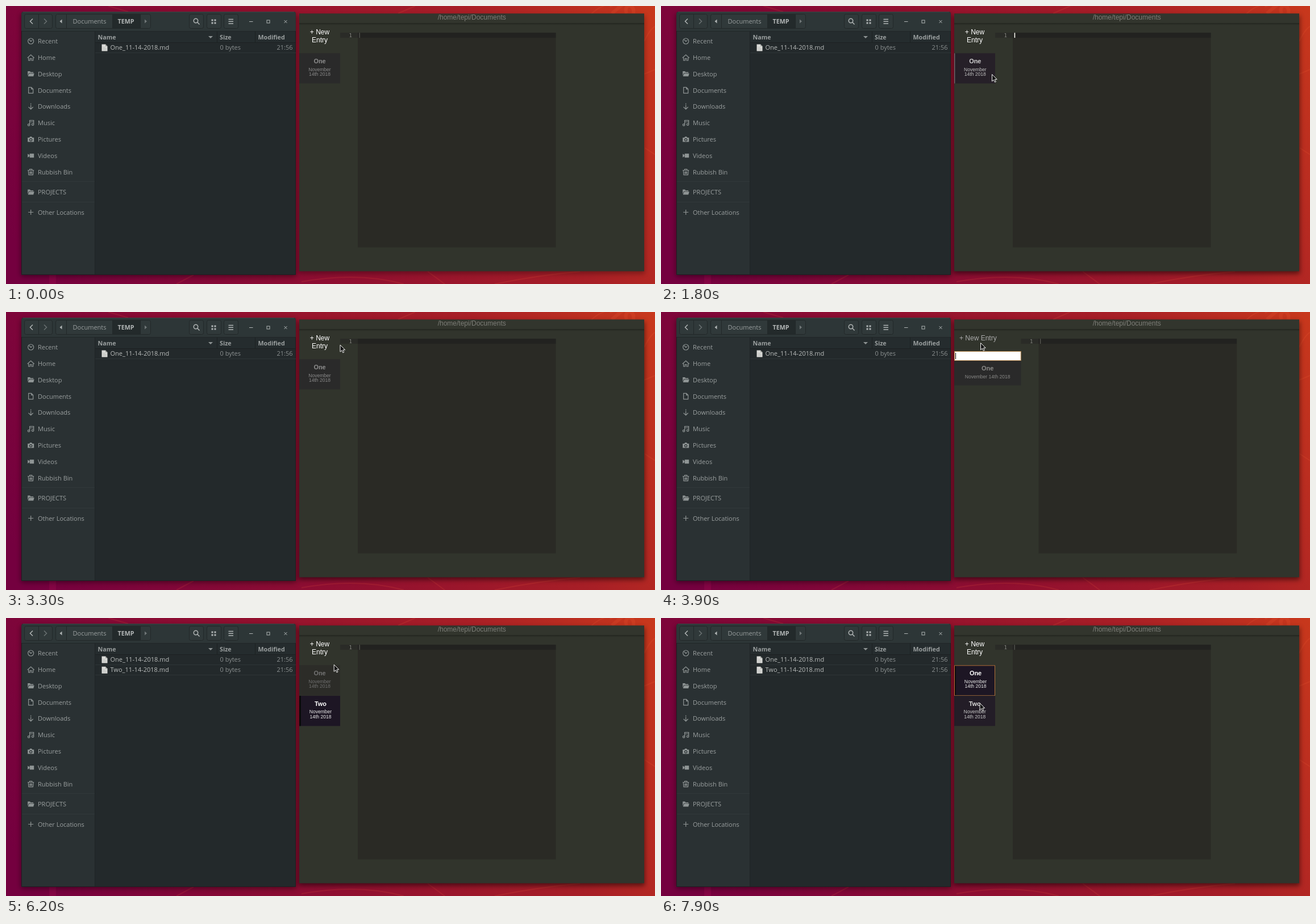
Animation of 1142x490 px, one loop 8000 ms. Source, as an HTML page:

```html
<!DOCTYPE html>
<html lang="en">
<head>
<meta charset="utf-8">
<title>Journal entries</title>
<style>
html, body { margin: 0; width: 100%; height: 100%; overflow: hidden; background: #8a1032; }
svg { display: block; width: 1142px; height: 490px; }
text { white-space: pre; }
.ui { font-family: "Open Sans", "Noto Sans", sans-serif; font-size: 11px; fill: #9a9f9f; }
.b { font-weight: 700; font-size: 10.7px; }
.app { font-family: "Liberation Sans", Arial, sans-serif; font-size: 12px; }
.mono { font-family: "DejaVu Sans Mono", monospace; font-size: 9px; fill: #85867f; }
.mid { text-anchor: middle; }
.end { text-anchor: end; }
.name { font-weight: 700; font-size: 10.9px; }
.date { font-size: 8.55px; }
.ico { fill: none; stroke: #8f9595; stroke-width: 1.2; }
.solid { fill: #8f9595; stroke: none; }
.btn { fill: #30393a; stroke: #222829; }
</style>
</head>
<body>
<svg viewBox="0 0 1142 490" xmlns="http://www.w3.org/2000/svg">
  <defs>
    <linearGradient id="wall" gradientUnits="userSpaceOnUse" x1="60" y1="520" x2="1150" y2="20">
      <stop offset="0" stop-color="#74003f"/>
      <stop offset=".45" stop-color="#92102f"/>
      <stop offset=".75" stop-color="#a81f26"/>
      <stop offset="1" stop-color="#c8381c"/>
    </linearGradient>
    <linearGradient id="drop" x2="0" y2="1">
      <stop offset="0" stop-color="#1f211c" stop-opacity=".8"/>
      <stop offset="1" stop-color="#1f211c" stop-opacity="0"/>
    </linearGradient>
    <filter id="soft" x="-10%" y="-10%" width="120%" height="120%"><feGaussianBlur stdDeviation="4.5"/></filter>
    <g id="file">
      <path d="M0 0h6.5l3.5 3.5v8.5h-10z" fill="#d9dad7"/>
      <path d="M6.5 0v3.5h3.5z" fill="#9fa19e"/>
      <path d="M2 5.5h4M2 7.5h6M2 9.5h6" stroke="#b4b5b2" stroke-width=".7"/>
    </g>
    <g id="folder" class="solid"><path d="M-5.5 -4.5h4l1 1.5h5v1.5h-8l-2 5z"/><path d="M-3 -.7h9l-1.5 5.2h-9.5z"/></g>
  </defs>

  <rect width="1142" height="490" fill="url(#wall)"/>
  <g fill="none" stroke="#ff7040" stroke-opacity=".13" stroke-width="2">
    <path d="M1030 14Q1042 2 1058 -2M1123 120L1142 112M1123 62Q1134 40 1142 36M1124 250L1142 262"/>
    <path d="M1062 0q10 -6 20 0l-16 13M1092 13q-4 -10 4 -14q10 2 8 14" stroke-width="6"/>
    <path d="M300 490L330 474M520 486Q620 468 700 490M742 468L772 490M860 490Q940 474 1010 468M180 0L215 10M690 13L720 0"/>
    <path d="M82 474v16" stroke-width="12" stroke="#e02070"/>
  </g>

  <rect id="shade" x="515" y="17" width="609" height="455" filter="url(#soft)"/>
  <rect x="26" y="13" width="485" height="464" rx="4" filter="url(#soft)" opacity=".4"/>

  <!-- file manager -->
  <path d="M27 474V14q0 -4 4 -4H506q4 0 4 4V474z" fill="#2a3133"/>
  <path d="M27.5 44V14q0 -3.5 4 -3.5H506q3.5 0 3.5 3.5V44z" fill="#2d3637"/>
  <path d="M30 10.5H507" stroke="#3b4546"/>
  <path d="M27 44.5H510" stroke="#202627"/>
  <rect x="156" y="45" width="354" height="429" fill="#23292b"/>
  <rect x="157" y="45" width="353" height="19" fill="#252c2e"/>
  <path d="M156.5 45V474" stroke="#1e2425"/>
  <path d="M157 64.5H510M371.5 45V64M438.5 45V64" stroke="#1c2122"/>
  <path d="M27.5 44V473.5H509.5V44" fill="none" stroke="#1c2122"/>
  <g id="manager"></g>
  <g id="row1"></g>
  <g id="row2"></g>

  <!-- journal window -->
  <rect x="516" y="13.5" width="607" height="454" fill="#31342c"/>
  <rect x="516" y="13.5" width="607" height="17" fill="#32352d"/>
  <rect x="516" y="30" width="607" height="4" fill="url(#drop)"/>
  <text class="app mid" x="819.7" y="24" fill="#7d7e78">/home/tepi/Documents</text>
  <g id="editor">
    <rect x="588" y="47" width="31" height="9" fill="#2a2b27"/>
    <rect x="619" y="47" width="348.5" height="378.5" fill="#2a2a25"/>
    <rect x="619" y="47" width="348.5" height="9" fill="#222220"/>
    <text class="mono" x="603.5" y="54.7">1</text>
    <rect id="caret" x="621.6" y="47.2" height="8.8"/>
  </g>
  <g id="narrow" class="app">
    <g class="label mid"><text x="552" y="50">+ New</text><text x="552" y="63.6">Entry</text></g>
  </g>
  <g id="wide" class="app">
    <text class="label" x="525" y="50">+ New Entry</text>
    <rect x="516" y="86" width="117.5" height="43.3" fill="#2a2a2a"/>
    <text class="name mid" x="574.7" y="103" fill="#8c8c8a">One</text>
    <text class="date mid" x="574.7" y="116.7" fill="#888886">November 14th 2018</text>
    <rect x="516.5" y="69.5" width="116.7" height="16" fill="#fff" stroke="#b98a50"/>
    <text id="typed" x="518" y="81" font-size="9.6" fill="#000"></text>
    <rect id="bar" y="72" width="1" height="11" fill="#000"/>
  </g>

  <path id="arrow" d="M0 0V12.2L2.9 9.6L4.8 13.8L6.8 12.9L4.9 8.8H8.7z" fill="#141414" stroke="#f2f2f2" stroke-width="1" stroke-linejoin="round"/>
  <g id="beam" fill="none">
    <path d="M-2.5 -5.5Q0 -5.5 0 -4V4Q0 5.5 2.5 5.5M2.5 -5.5Q0 -5.5 0 -4M0 4Q0 5.5 -2.5 5.5" stroke="#ddd" stroke-width="2.6"/>
    <path d="M-2.5 -5.5Q0 -5.5 0 -4V4Q0 5.5 2.5 5.5M2.5 -5.5Q0 -5.5 0 -4M0 4Q0 5.5 -2.5 5.5" stroke="#111" stroke-width="1.2"/>
  </g>
</svg>
<script>
const LOOP = 8000, STEP = 100;
const $ = id => document.getElementById(id);
const set = (el, attrs) => { for (const k in attrs) el.setAttribute(k, attrs[k]); };
const show = (el, on) => { el.style.display = on ? '' : 'none'; };
const grey = v => `rgb(${v},${v},${v})`;
const label = (x, y, s, cls = '', more = '') => `<text class="ui ${cls}" x="${x}" y="${y}" ${more}>${s}</text>`;

// Sidebar: name, centre y, icon
const FOLDER = '<use href="#folder"/>';
const places = [
  ['Recent', 62, '<circle r="5"/><path d="M-2.5 -2.5L0 .5L2.5 -1.5"/>'],
  ['Home', 91, '<path d="M-6 .5L0 -5L6 .5M-4 0V5H-1.3V1.5H1.3V5H4V0"/>'],
  ['Desktop', 119.5, FOLDER],
  ['Documents', 148.5, '<path d="M-4 -5.2H1L4 -2V5.2H-4zM1 -5V-2H4"/>'],
  ['Downloads', 177, '<path d="M0 -5.5V-3.5M0 -2.5V5M-4 1L0 5L4 1"/>'],
  ['Music', 206, '<path d="M-2 3.5V-4.5H5V2.5M-2 -2H5"/><circle cx="-3.6" cy="3.5" r="1.7"/><circle cx="3.4" cy="2.7" r="1.7"/>'],
  ['Pictures', 235, '<path class="solid" fill-rule="evenodd" d="M-5.5 -3H-2.5L-1.5 -4.7H1.5L2.5 -3H5.5V4.5H-5.5zM0 -2A2.8 2.8 0 1 0 .01 -2z"/><circle class="solid" cy=".8" r="1.5"/>'],
  ['Videos', 263.5, '<path class="solid" d="M-2 -3.2H5.5V3.7H-2zM-5.5 -3L-2.5 -1V1.5L-5.5 3.5z"/>'],
  ['Rubbish Bin', 292.5, '<path d="M-5.5 -3H5.5M-2 -3V-5H2V-3M-4.5 -3L-3.7 5.2H3.7L4.5 -3M-1.7 -1V3.5M0 -1V3.5M1.7 -1V3.5"/>'],
  ['PROJECTS', 328, FOLDER],
  ['Other Locations', 363.5, '<path d="M-4.5 0H4.5M0 -4.5V4.5"/>'],
];
const button = (x, w) => `<rect class="btn" x="${x}.5" y="14.5" width="${w}" height="25" rx="3"/>`;

$('manager').innerHTML =
  places.map(([s, y, icon]) => `<g class="ico" transform="translate(43.7 ${y})">${icon}</g>` + label(56, y + 4, s)).join('') +
  '<path d="M28 309.5H156M28 345.5H156" stroke="#31383a"/>' +
  button(32, 49) + button(87, 167) + button(322, 25) + button(353, 25) + button(383, 25) +
  '<rect x="187" y="15" width="49" height="24" fill="#232a2b"/>' +
  '<path d="M57.5 15V39M106.5 15V39M187.5 15V39M236.5 15V39" stroke="#222829"/>' +
  label(117.5, 31, 'Documents') + label(196.5, 31, 'TEMP', 'b', 'style="fill:#b4b8b8"') +
  `<g class="ico" style="stroke:#b0b5b5;stroke-width:1.5">
    <path d="M47 22.5L42.5 27L47 31.5"/><path d="M67 22.5L71.5 27L67 31.5" stroke-opacity=".45"/>
    <circle cx="334" cy="26" r="3.7"/><path d="M336.8 28.8L340.5 32.5M391.5 23.5H400M391.5 27.2H400M391.5 31H400"/>
    <g stroke-width="1"><path d="M428 27.5H434.5M489.5 25L494.5 30M494.5 25L489.5 30"/><rect x="459" y="25" width="5" height="5"/></g>
  </g>
  <g fill="#b0b5b5"><path d="M98.5 23.5V30.5L94.5 27z"/><path d="M244 23.5V30.5L248 27z" opacity=".5"/>
    <path d="M361.5 23.5h3v3h-3zM366.5 23.5h3v3h-3zM361.5 28.5h3v3h-3zM366.5 28.5h3v3h-3z"/>
    <path d="M356 53H364L360 57z" opacity=".75"/></g>` +
  label(161.5, 58.5, 'Name', 'b') + label(376, 58.5, 'Size', 'b') + label(443.5, 58.5, 'Modified', 'b');

['One', 'Two'].forEach((s, i) => {
  const y = 77 + i * 18.3;
  $('row' + (i + 1)).innerHTML =
    `<use href="#file" x="168.5" y="${y - 9.5}"/><path d="M157 ${82.5 + i * 18}H510" stroke="#2e3537"/>` +
    label(183.5, y, s + '_11-14-2018.md', '', 'style="fill:#b9bcbb"') +
    label(376.5, y, '0 bytes', '', 'style="fill:#8b9090"') +
    label(504.5, y, '21:56', 'end', 'style="fill:#8b9090"');
});

// Linear interpolation through rows of [time, ...values]
function track(keys, t) {
  if (t <= keys[0][0]) return keys[0].slice(1);
  for (let i = 1; i < keys.length; i++) {
    const [a, b] = [keys[i - 1], keys[i]];
    if (t < b[0]) {
      const k = (t - a[0]) / (b[0] - a[0]);
      return a.slice(1).map((v, j) => v + (b[j + 1] - v) * k);
    }
  }
  return keys[keys.length - 1].slice(1);
}

// Entry looks: r, g, b, name grey, date grey, text shift, bar width, bar grey, outline
const REST = [42, 42, 42, 142, 138, 0, 0, 110, 0];
const DIM = [44, 44, 40, 116, 112, 0, 0, 110, 0];
const HOVER = [38, 32, 40, 208, 192, .8, 1.3, 112, 0];
const PICKED = [29, 22, 36, 255, 235, 1.5, 3, 10, 0];
const FOCUS = [29, 22, 36, 255, 235, 1.5, 3, 10, 1];
const NEXT = [35, 29, 39, 215, 200, .2, 0, 60, 0];

const looks = [
  [[1600, ...REST], [1800, ...HOVER], [1900, ...HOVER], [2200, ...REST], [6000, ...REST], [6200, ...DIM],
   [7100, ...DIM], [7300, ...HOVER], [7400, ...HOVER], [7500, ...FOCUS]],
  [[6000, ...REST], [6200, ...PICKED], [7400, ...PICKED], [7600, ...REST], [7700, ...REST], [7900, ...NEXT]],
];

const NS = 'http://www.w3.org/2000/svg';
const entries = ['One', 'Two'].map((s, i) => {
  const g = document.createElementNS(NS, 'g');
  g.setAttribute('transform', `translate(516 ${83.3 + i * 53.8})`);
  g.innerHTML = `<rect width="72" height="53.2"/><rect height="53.2"/>
    <rect x=".5" y=".5" width="71" height="53" fill="none" stroke="#b07038"/>
    <g class="mid"><text class="name" x="36" y="17.7">${s}</text>
    <text class="date" x="36" y="31.3">November</text><text class="date" x="36" y="40.2">14th 2018</text></g>`;
  $('narrow').append(g);
  const [bg, bar, outline, words] = g.children;
  return { g, bg, bar, outline, words, keys: looks[i] };
});

function drawEntry(e, t) {
  const [r, g, b, name, date, dx, w, barGrey, line] = track(e.keys, t);
  set(e.bg, { fill: `rgb(${r},${g},${b})` });
  set(e.bar, { width: w, fill: grey(barGrey) });
  set(e.outline, { opacity: line });
  set(e.words, { transform: `translate(${dx} 0)` });
  [...e.words.children].forEach((el, i) => set(el, { fill: grey(i ? date : name) }));
}

const pointer = [
  [500, 850, 330], [800, 770, 260], [1300, 690, 204], [1500, 640, 160], [1700, 590, 126], [1800, 582.5, 120.5],
  [2000, 572, 90], [2200, 556, 66], [2300, 545, 60], [2400, 541, 58], [2500, 541, 58], [2700, 590, 48],
  [2900, 700, 32], [3000, 736, 30], [3100, 710, 40], [3200, 640, 53], [3300, 588, 58], [3400, 573, 57],
  [3600, 562.5, 54.5], [3900, 562.5, 54.5], [4100, 572, 72], [4300, 577.5, 82.5], [7100, 577, 82],
  [7300, 568, 101], [7500, 558, 112], [7700, 555, 122], [7800, 558, 136], [7900, 561, 150],
];
const labelGrey = [
  [2100, 255], [2300, 165], [2600, 165], [2800, 255], [3300, 255], [3600, 170], [3900, 170], [4200, 255],
];
const shadow = [[400, .3], [700, .5]];
const blinkOn = t => t < 900 || (t >= 1400 && t < 1900) || (t >= 2400 && t < 2900) || t >= 3500;
const typing = [[5300, 'Two'], [5200, 'Tw'], [5000, 'T'], [0, '']];
const labels = [...document.querySelectorAll('.label')];

function draw(t) {
  const wide = t >= 3900 && t < 6100;
  const focused = t >= 500 && t < 3900;
  show($('wide'), wide);
  show($('narrow'), !wide);
  show($('row2'), t >= 6100);
  show(entries[1].g, t >= 6100);
  entries.forEach(e => drawEntry(e, t));

  set($('editor'), { transform: `translate(${wide ? 45.6 : 0} 0)` });
  set($('caret'), { width: focused ? 1.6 : 1, fill: focused ? '#f8f8f0' : '#686862' });
  show($('caret'), !focused || blinkOn(t));
  set($('shade'), { opacity: track(shadow, t)[0] });
  const tint = grey(track(labelGrey, t)[0]);
  labels.forEach(el => set(el, { fill: tint }));

  if (wide) {
    $('typed').textContent = typing.find(k => t >= k[0])[1];
    set($('bar'), { x: 518 + $('typed').getComputedTextLength() });
    show($('bar'), t < 4600 || (t >= 5000 && t < 5800));
  }

  const [x, y] = track(pointer, t);
  const beam = wide && y > 70;
  const place = { transform: `translate(${x} ${y})` };
  set($('arrow'), place);
  set($('beam'), place);
  show($('arrow'), t >= 500 && !beam);
  show($('beam'), beam);
}

const start = performance.now();
function tick(now) {
  const t = Math.max(0, now - start) % LOOP;
  draw(Math.floor(t / STEP) * STEP);
  requestAnimationFrame(tick);
}
draw(0);
requestAnimationFrame(tick);
</script>
</body>
</html>
```
